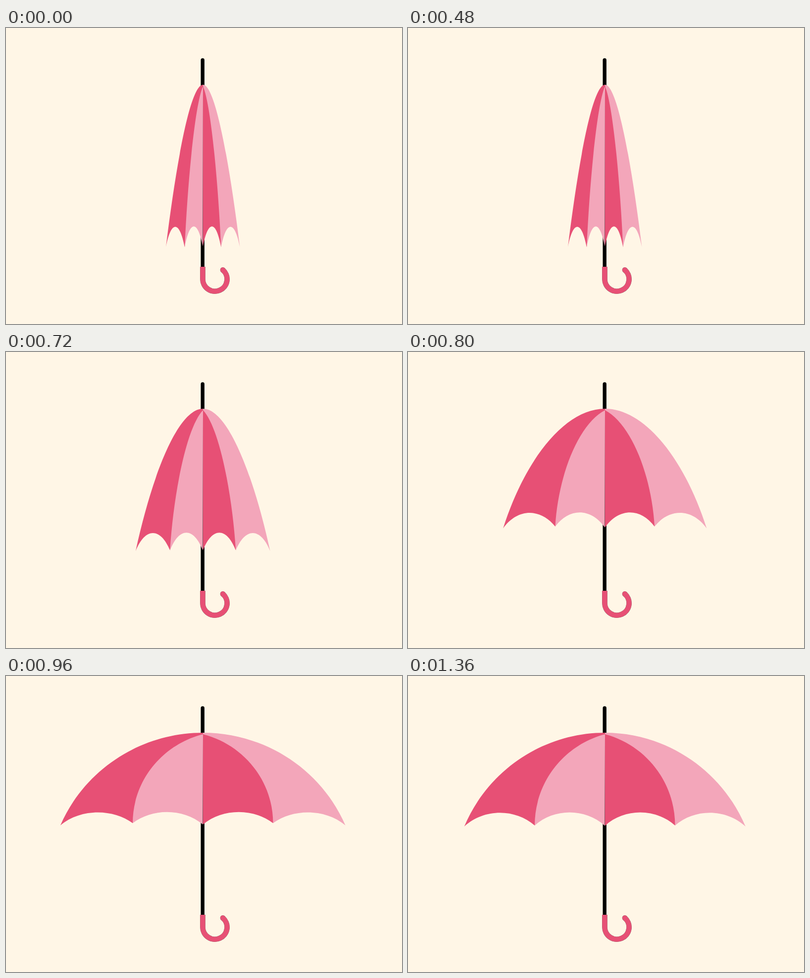
An HTML page for the animation above (2040 ms loop, 800 px wide and 600 px high).

```html
<!DOCTYPE html>
<html lang="en">
<head>
<meta charset="utf-8">
<title>Umbrella</title>
<style>
  html, body { margin: 0; width: 100%; height: 100%; overflow: hidden; background: #fff6e6; }
  svg { display: block; width: 100%; height: 100%; }
  .dark { fill: #e75075; }
  .pale { fill: #f3a6ba; }
  .line { fill: none; }
</style>
</head>
<body>
<svg viewBox="0 0 800 600">
  <defs>
    <g id="hook" class="line">
      <path d="M397.4 484V509A24.6 24.6 0 1 0 438 490.4"/>
      <path d="M438 490.4h.01" stroke-linecap="round"/>
    </g>
  </defs>
  <path class="line" d="M397.2 65V488" stroke="#000" stroke-width="7.4" stroke-linecap="round"/>
  <use href="#hook" stroke="#3d1822" stroke-width="10.7" opacity=".65"/>
  <use href="#hook" stroke="#e75075" stroke-width="10.1"/>
  <path id="outerL" class="dark"/>
  <path id="outerR" class="pale"/>
  <path id="innerL" class="pale"/>
  <path id="innerR" class="dark"/>
</svg>
<script>
const LOOP = 2040, STEP = 40;
const OPEN = 600, PEAK = 880, REST = 1120;
const AXIS = 398, TOP = 115, RIB_TOP = 118, HUB = 397.5, MIRROR = 795.5;

// Key points of the left half; dip is the depth of the hem arcs.
const closed = { tipX: 323, tipY: 444, midX: 361, midY: 444.5, hubY: 442.5, dip: 55, spread: 0 };
const over = { tipX: 107, tipY: 301, midX: 256, midY: 294.7, hubY: 298.7, dip: 29, spread: 1 };
const open = { tipX: 113.7, tipY: 305, midX: 256, midY: 303, hubY: 303.5, dip: 35.5, spread: 1 };

const mix = (a, b, p) => a + (b - a) * p;

function blend(a, b, p) {
  const out = {};
  for (const key in a) out[key] = mix(a[key], b[key], p);
  return out;
}

function poseAt(t) {
  if (t <= OPEN) return closed;
  if (t >= REST) return open;
  if (t <= PEAK) return blend(closed, over, ((t - OPEN) / (PEAK - OPEN)) ** 1.49);
  const p = (t - PEAK) / (REST - PEAK);
  return blend(over, open, 1 - (1 - p) ** 1.4);
}

const curve = (flip, ...pts) =>
  "C" + pts.map(([x, y]) => `${(flip ? MIRROR - x : x).toFixed(2)} ${y.toFixed(2)}`).join(" ");

// Curve from the axis down to (x, y); handles are fractions of its width and height.
function spoke(flip, top, x, y, outX, outY, inX, inY) {
  const w = AXIS - x, h = y - top;
  return curve(flip, [AXIS - outX * w, top + outY * h], [x + inX * w, y - inY * h], [x, y]);
}

function hem(flip, x1, y1, x2, y2, dip) {
  const y = (y1 + y2) / 2 - dip, inset = (x2 - x1) * 0.28;
  return curve(flip, [x1 + inset, y], [x2 - inset, y], [x2, y2]);
}

const setPath = (id, d) => document.getElementById(id).setAttribute("d", d);

function drawHalf(side, flip, { tipX, tipY, midX, midY, hubY, dip, spread: s }) {
  const dome = spoke(flip, TOP, tipX, tipY, mix(0.34, 0.435, s), 0, mix(0.28, 0.17, s), mix(0.517, 0.605, s));
  const rib = spoke(flip, RIB_TOP, midX, midY, mix(0.46, 0.59, s), 0.12, mix(0.15, 0, s), mix(0.38, 0.47, s));
  setPath("outer" + side, `M${AXIS} ${TOP}` + dome + hem(flip, tipX, tipY, midX, midY, dip) + `L${AXIS} ${RIB_TOP}Z`);
  setPath("inner" + side, `M${AXIS} ${RIB_TOP}` + rib + hem(flip, midX, midY, HUB, hubY, dip) + "Z");
}

const start = performance.now();

function tick() {
  const t = (performance.now() - start) % LOOP;
  const pose = poseAt(Math.floor(t / STEP) * STEP);
  drawHalf("L", false, pose);
  drawHalf("R", true, pose);
  requestAnimationFrame(tick);
}
tick();
</script>
</body>
</html>
```
